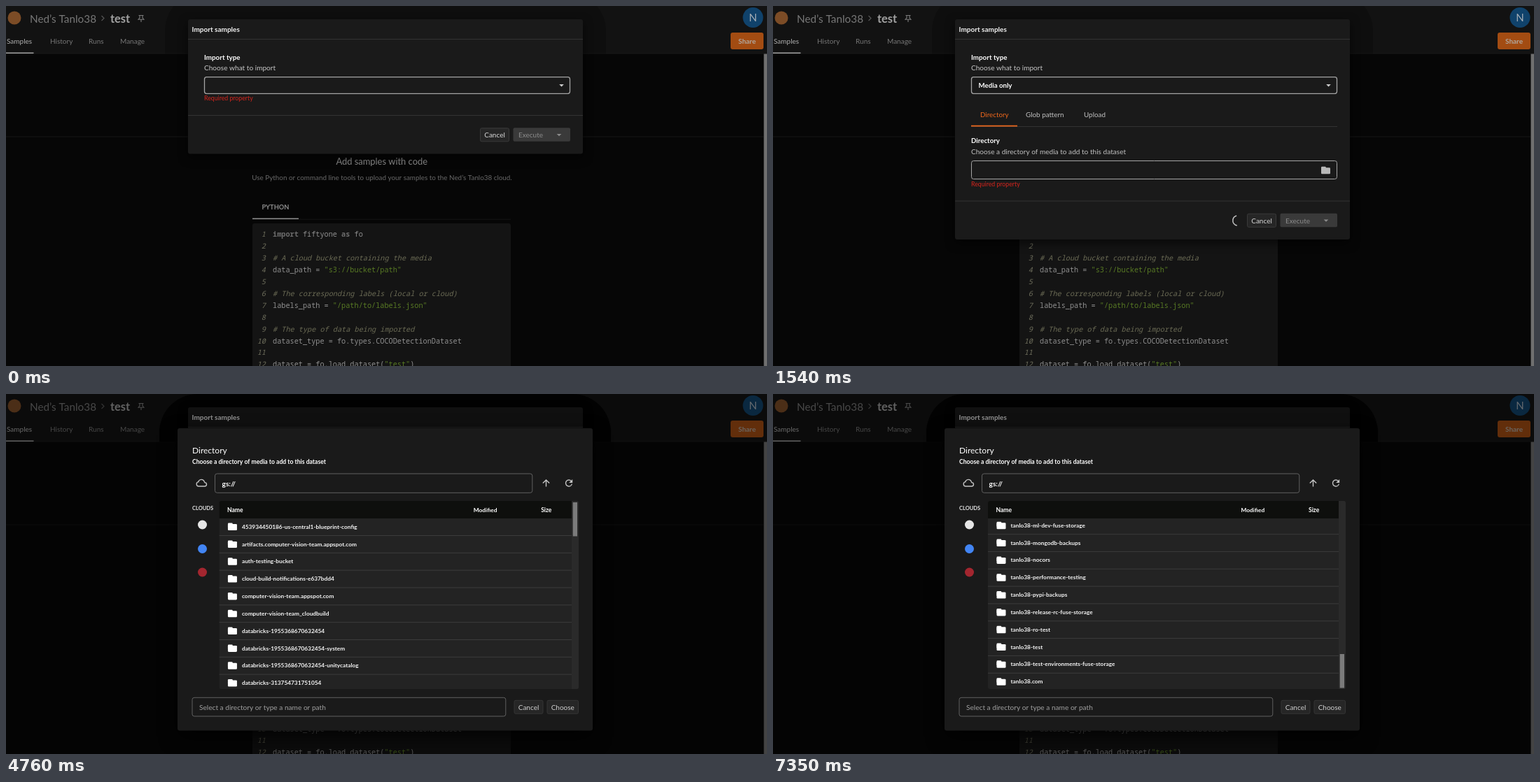
Animation of 1087x515 px, one loop 8000 ms. Source, as an HTML page with a canvas:

```html
<!DOCTYPE html>
<html lang="en">
<head>
<meta charset="utf-8">
<title>Import samples</title>
<style>
html, body { margin: 0; width: 100%; height: 100%; overflow: hidden; background: #060606; }
canvas { display: block; width: 1087px; height: 515px; }
</style>
</head>
<body>
<canvas id="stage"></canvas>
<script>
const W = 1087, H = 515, LOOP = 8000, STEP = 70;
const SANS = 'Lato, "Open Sans", sans-serif';
const MONO = '"Noto Sans Mono", "DejaVu Sans Mono", monospace';
const canvas = document.getElementById('stage');
const ctx = canvas.getContext('2d');
const dpr = window.devicePixelRatio || 1;
canvas.width = W * dpr;
canvas.height = H * dpr;

const clamp = v => Math.max(0, Math.min(1, v));
const ease = v => 1 - (1 - v) * (1 - v);
const lerp = (a, b, p) => a + (b - a) * p;
// Progress over a run of steps whose first one is already under way.
const ramp = (t, from, steps) => clamp((t - from + STEP) / (steps * STEP));

// ---- helpers ----
function rect(x, y, x2, y2, fill) {
  ctx.fillStyle = fill;
  ctx.fillRect(x, y, x2 - x, y2 - y);
}

function box(x, y, x2, y2, r, fill, stroke, line = 1) {
  ctx.beginPath();
  ctx.roundRect(x, y, x2 - x, y2 - y, r);
  if (fill) { ctx.fillStyle = fill; ctx.fill(); }
  if (stroke) { ctx.strokeStyle = stroke; ctx.lineWidth = line; ctx.stroke(); }
}

// y is the middle of the capitals
function text(s, x, y, size, color, style = '', align = 'left', family = SANS) {
  ctx.font = `${style} ${size}px ${family}`;
  ctx.textAlign = align;
  ctx.fillStyle = color;
  ctx.fillText(s, x, y + size * 0.35);
}

function disc(x, y, r, fill) {
  ctx.beginPath();
  ctx.arc(x, y, r, 0, 7);
  ctx.fillStyle = fill;
  ctx.fill();
}

function lines(color, width, ...paths) {
  ctx.strokeStyle = color;
  ctx.lineWidth = width;
  ctx.beginPath();
  for (const p of paths)
    for (let i = 0; i < p.length; i += 2)
      i ? ctx.lineTo(p[i], p[i + 1]) : ctx.moveTo(p[i], p[i + 1]);
  ctx.stroke();
}

function caret(x, y, color) {
  ctx.fillStyle = color;
  ctx.beginPath();
  ctx.moveTo(x - 3.3, y - 1.6);
  ctx.lineTo(x + 3.3, y - 1.6);
  ctx.lineTo(x, y + 1.8);
  ctx.fill();
}

function folder(x, y, color) {
  box(x - 6.5, y - 5.2, x + 0.3, y + 2, 1.3, color);
  box(x - 6.5, y - 3.7, x + 6.5, y + 5.3, 1.3, color);
}

function shadow(blur, dy, alpha) {
  ctx.shadowColor = `rgba(0,0,0,${alpha})`;
  ctx.shadowBlur = blur * dpr;
  ctx.shadowOffsetY = dy * dpr;
}

function button(label, x, y, x2, color, fill, edge) {
  box(x + .5, y + .5, x2 - .5, y + 19.5, 2, fill, edge);
  text(label, (x + x2) / 2, y + 10.3, 10, color, '', 'center');
}

// ---- page behind the dialogs ----
const KEY = 'bold #6c6c6c', CODE = '#8f8f8f', STR = '#587a24', NOTE = 'italic #6b6b55';
const code = [
  [['import', KEY], [' fiftyone ', CODE], ['as', KEY], [' fo', CODE]],
  [],
  [['# A cloud bucket containing the media', NOTE]],
  [['data_path = ', CODE], ['"s3://bucket/path"', STR]],
  [],
  [['# The corresponding labels (local or cloud)', NOTE]],
  [['labels_path = ', CODE], ['"/path/to/labels.json"', STR]],
  [],
  [['# The type of data being imported', NOTE]],
  [['dataset_type = fo.types.COCODetectionDataset', CODE]],
  [],
  [['dataset = fo.load_dataset(', CODE], ['"test"', STR], [')', CODE]]
];

function drawCode() {
  const size = 10.22;
  box(352, 311, 721, 530, 3, '#141414');
  code.forEach((parts, i) => {
    const y = 326.5 + i * 16.94;
    let x = 381;
    text(i + 1, 371, y, size, '#6e6e5c', 'italic', 'right', MONO);
    for (const [s, look] of parts) {
      const [color, style] = look.split(' ').reverse();
      text(s, x, y, size, color, style, 'left', MONO);
      x += ctx.measureText(s).width;
    }
  });
}

function drawPage() {
  rect(0, 0, W, H, '#060606');
  rect(0, 0, W, 68, '#121212');
  rect(0, 67.5, W, 68.5, '#191919');

  disc(12, 17, 9.5, '#7c4c26');
  text('Ned’s Tanlo38', 34, 18.5, 15.3, '#777');
  lines('#555', 1.2, [136.5, 14, 140, 17.5, 136.5, 21]);
  text('test', 149, 18.5, 16.4, '#a2a2a2', 'bold');
  lines('#7c7c7c', 1.1, [189.5, 13.5, 196.5, 13.5], [191, 13.5, 191, 17, 189, 19.3, 197, 19.3, 195, 17, 195, 13.5], [193, 19.3, 193, 23]);

  text('Samples', 1, 50, 10, '#b0b0b0');
  text('History', 63, 50, 10, '#777');
  text('Runs', 118, 50, 10, '#777');
  text('Manage', 163, 50, 10, '#777');
  rect(0, 66.5, 39.5, 68, '#a2a2a2');

  disc(1067, 16.5, 14.5, '#10426b');
  text('N', 1067, 17, 15, '#a8b0b8', '', 'center');
  box(1035, 38, 1082, 62, 3, '#a34c12');
  text('Share', 1058.5, 50, 10, '#b0a69c', 'bold', 'center');

  rect(0, 186.5, 1082, 187.5, '#171717');
  rect(1082.5, 68.5, W, H, '#707070');

  text('Add samples with code', 536.7, 222, 12.9, '#8c8c8c', '', 'center');
  text('Use Python or command line tools to upload your samples to the Ned’s Tanlo38 cloud.', 537, 245.3, 9.86, '#686868', '', 'center');
  rect(352, 304.7, 721, 305.5, '#181818');
  text('PYTHON', 385, 288, 9.3, '#8c8c8c', 'bold', 'center');
  rect(352, 303.5, 418, 305, '#8c8c8c');
  drawCode();
}

// ---- import dialog ----
function drawSelect(picked) {
  box(283.5, 101.7, 805.5, 125.3, 3, null, '#a4a4a4', 1.3);
  caret(793.5, 113.7, '#ccc');
  if (picked) text('Media only', 293.5, 114, 9.7, '#fff', 'bold');
}

function drawTabs(t) {
  const hover = t < 2240 ? ramp(t, 1820, 3) : 1 - ramp(t, 2240, 2);
  const edge = Math.round(lerp(165, 205, hover));
  rect(283, 172, 806, 173, '#333');
  rect(283, 170.7, 349, 172.4, '#f0681c');
  text('Directory', 296, 155.3, 9.8, '#f0681c');
  text('Glob pattern', 361, 155.3, 9.9, '#c2c2c2');
  text('Upload', 444, 155.3, 9.9, '#c2c2c2');
  text('Directory', 283, 193, 9.7, '#fff', 'bold');
  text('Choose a directory of media to add to this dataset', 283, 208.5, 10.1, '#c2c2c2');
  box(283.5, 221.5, 805.5, 247.5, 3, null, `rgb(${edge},${edge},${edge})`);
  folder(789.5, 235, '#b8b8b8');
}

function drawSpinner(t, y) {
  if (t < 980 || t >= 1750) return;
  const p = (t - 980) / 560, deg = Math.PI / 180;
  ctx.beginPath();
  ctx.arc(664, y, 7.2, p * 100 * deg, (12 + p * 243) * deg);
  ctx.strokeStyle = '#c4c4c4';
  ctx.lineWidth = 1.5;
  ctx.stroke();
}

// Dark arch that a dialog casts on the page header.
function drawArch(dim) {
  ctx.save();
  ctx.beginPath();
  ctx.rect(0, 0, W, 68.5);
  ctx.clip();
  box(lerp(227, 219, dim), lerp(-20, 0, dim), lerp(857, 864, dim), 160, 55, `rgba(0,0,0,${lerp(.2, .85, dim)})`);
  ctx.restore();
}

function drawImport(t, dim) {
  const full = t >= 1260, dy = full ? 122.5 : 0;
  drawArch(dim);
  ctx.save();
  shadow(14, 5, .6);
  box(260, 19, 824, 211.5 + dy, 3, '#1a1a1a');
  ctx.restore();
  text('Import samples', 265.5, 33.5, 10, '#f2f2f2', 'bold');
  rect(260, 47, 824, 48, '#333');
  text('Import type', 283, 73.3, 9.8, '#fff', 'bold');
  text('Choose what to import', 283, 88.8, 10.1, '#c8c8c8');
  drawSelect(t >= 980);
  if (full) drawTabs(t);
  text('Required property', 283, 132.2 + dy, 8.75, '#d6241c');
  rect(260, 156 + dy, 824, 157 + dy, '#333');
  drawSpinner(t, 184.5 + dy);
  button('Cancel', 677, 174.3 + dy, 719, '#d8d8d8', '#262626', '#3a3a3a');
  box(724.5, 174.3 + dy, 806, 193.8 + dy, 2, '#3a3a3a');
  text('Execute', 732, 184.5 + dy, 10, '#8c8c8c');
  caret(790, 184.5 + dy, '#8c8c8c');
}

const options = [
  ['Media only', 'Add new samples for media'],
  ['Labels only', 'Add labels to existing samples'],
  ['Media and labels', 'Add new samples with media and labels']
];

function drawMenu(t) {
  const open = ease(ramp(t, 140, 4));
  const a = t < 140 ? 0 : t < 980 ? open : .7 * clamp(1 - (t - 980) / 190);
  if (a <= 0) return;
  ctx.save();
  ctx.globalAlpha = a;
  ctx.save();
  shadow(10, 3, .4);
  box(283, 125.5, 806, 248, 3, '#2c2c2c');
  ctx.restore();
  ctx.globalAlpha = Math.min(1, a * 1.4);
  options.forEach(([title, note], i) => {
    const y = 144.2 + i * 36.8;
    text(title, 294.5, y, 10, '#f2f2f2');
    text(note, 294.5, y + 13.3, 9, '#b8b8b8');
  });
  ctx.restore();
}

// ---- directory dialog ----
const cross = (a, b) => a.flatMap(x => b.map(y => `${x}-${y}`));
const kinds = ['archive', 'backups', 'cache', 'exports', 'logs', 'staging', 'uploads'];
const buckets = [
  '453934450186-us-central1-blueprint-config',
  'artifacts.computer-vision-team.appspot.com',
  'auth-testing-bucket',
  'cloud-build-notifications-e637bdd4',
  'computer-vision-team.appspot.com',
  'computer-vision-team_cloudbuild',
  ...['1955368670632454', '313754731751054', '3139252057380555', '3766218098980762', '4150927736180412', '5817204463095127']
    .flatMap(id => ['', '-system', '-unitycatalog'].map(end => `databricks-${id}${end}`)),
  ...cross(['dataset', 'demo', 'eval', 'gpu', 'image', 'media', 'sensor'], kinds),
  'ned-buckets',
  'us-east1-release-airflow-c786ea23-bucket',
  'tanlo-beam-temp',
  ...cross(['tanlo38'], [
    'api-automated-tests', 'cloud-build-slack-notifications', 'desktop-backups',
    'developer-configs', 'docs-pr-previews', 'ephemeral-environments-fuse-storage',
    'ephemeral-models-bucket',
    ...cross(['fiftyone', 'images', 'internal', 'media'], kinds),
    'ml-dev-fuse-storage', 'mongodb-backups', 'nocors', 'performance-testing', 'pypi-backups',
    'release-rc-fuse-storage', 'ro-test', 'test', 'test-environments-fuse-storage'
  ]),
  'tanlo38.com'
];
const ROW = 24.83, END = 2758;

function scrollAt(t) {
  if (t < 6090) return 0;
  if (t < 6580) return [139.5, 560, 850][Math.min(2, (t - 6090) / STEP)];
  if (t < 7140) return lerp(850, 1803.7, ease(ramp(t, 6580, 4)));
  return lerp(1803.7, END, ease(ramp(t, 7140, 4)));
}

function drawIcons() {
  const gray = '#c4c4c4';
  ctx.strokeStyle = gray;
  ctx.lineWidth = 1.4;
  ctx.beginPath();
  ctx.arc(275.4, 128.8, 3.2, Math.PI / 2, Math.PI * 1.45);
  ctx.arc(279, 127, 4.6, Math.PI * 1.12, Math.PI * 1.9);
  ctx.arc(283.8, 129.3, 2.7, Math.PI * 1.5, Math.PI / 2);
  ctx.closePath();
  ctx.stroke();
  lines(gray, 1.4, [771.5, 132.5, 771.5, 123], [766.8, 127.6, 771.5, 122.9, 776.2, 127.6]);
  ctx.beginPath();
  ctx.arc(804, 127.5, 4.5, .25, 5.5);
  ctx.stroke();
  ctx.fillStyle = gray;
  ctx.beginPath();
  ctx.moveTo(809.2, 122);
  ctx.lineTo(809.2, 127);
  ctx.lineTo(804.2, 127);
  ctx.fill();
}

function drawClouds(p) {
  if (!p) return;
  ctx.save();
  ctx.beginPath();
  ctx.rect(266, 153, 41 * p, 269);
  ctx.clip();
  text('CLOUDS', 266, 163.8, 7.5, '#e8e8e8', 'bold');
  disc(280.5, 187, 6.5, '#e6e6e6');
  disc(280.5, 221.5, 6.5, '#4285f4');
  disc(280.5, 255, 6.5, '#a3262f');
  ctx.restore();
}

function drawTable(t) {
  const p = t < 4620 ? 0 : ease(ramp(t, 4620, 4));
  const left = 266 + 41 * p, scroll = scrollAt(t);
  drawClouds(p);
  ctx.save();
  ctx.beginPath();
  ctx.roundRect(left, 153, 818 - left, 269, 3);
  ctx.clip();
  rect(left, 153, 818, 422, '#232323');
  buckets.forEach((name, i) => {
    const y = 189.8 + i * ROW - scroll;
    if (y < 160 || y > 440) return;
    folder(left + 19, y, '#fff');
    text(name, left + 32.5, y, 8.3, '#f6f6f6', 'bold');
    rect(left, y + 12.2, 808, y + 13.2, '#3b3b3b');
  });
  rect(left, 153, 808, 178, '#0e0f0d');
  text('Name', left + 11.5, 166, 8.6, '#fff', 'bold');
  text('Modified', 656.5 + 12 * p, 166, 8.4, '#fff', 'bold');
  text('Size', 752.5 + 12.5 * p, 166, 8.5, '#fff', 'bold');
  rect(808, 153, 818, 422, '#2a2a2a');
  const top = 155 + scroll / END * 217;
  rect(809.7, top, 816, top + 48.5, '#7b7b7b');
  ctx.restore();
}

function drawDirectory(t, a) {
  if (!a) return;
  ctx.save();
  ctx.globalAlpha = a;
  rect(0, 0, W, H, 'rgba(0,0,0,.4)');
  ctx.save();
  shadow(26, 9, .75);
  box(245, 49, 838, 481.5, 3, '#1a1a1a');
  ctx.restore();
  text('Directory', 266, 80.7, 12, '#fff');
  text('Choose a directory of media to add to this dataset', 266, 96.8, 8.65, '#fff', 'bold');
  box(298.5, 114, 751.8, 141.3, 3, null, '#606060');
  text('gs://', 308.5, 128, 10.2, '#fff', 'bold');
  drawIcons();
  drawTable(t);
  box(266, 434.3, 713.8, 461, 3, null, '#606060');
  text('Select a directory or type a name or path', 276, 448, 10.15, '#a0a0a0');
  button('Cancel', 725.5, 437.8, 767.5, '#d0d0d0', '#262626', '#353535');
  button('Choose', 772.5, 437.8, 818, '#d0d0d0', '#262626', '#353535');
  ctx.restore();
}

function draw(now) {
  const t = Math.floor((now % LOOP) / STEP) * STEP;
  const fade = t < 3080 ? 0 : ease(ramp(t, 3080, 6));
  ctx.setTransform(dpr, 0, 0, dpr, 0, 0);
  drawPage();
  drawImport(t, fade);
  drawMenu(t);
  drawDirectory(t, fade);
}

const start = performance.now();
function tick() {
  draw(performance.now() - start);
  requestAnimationFrame(tick);
}
tick();
</script>
</body>
</html>
```
